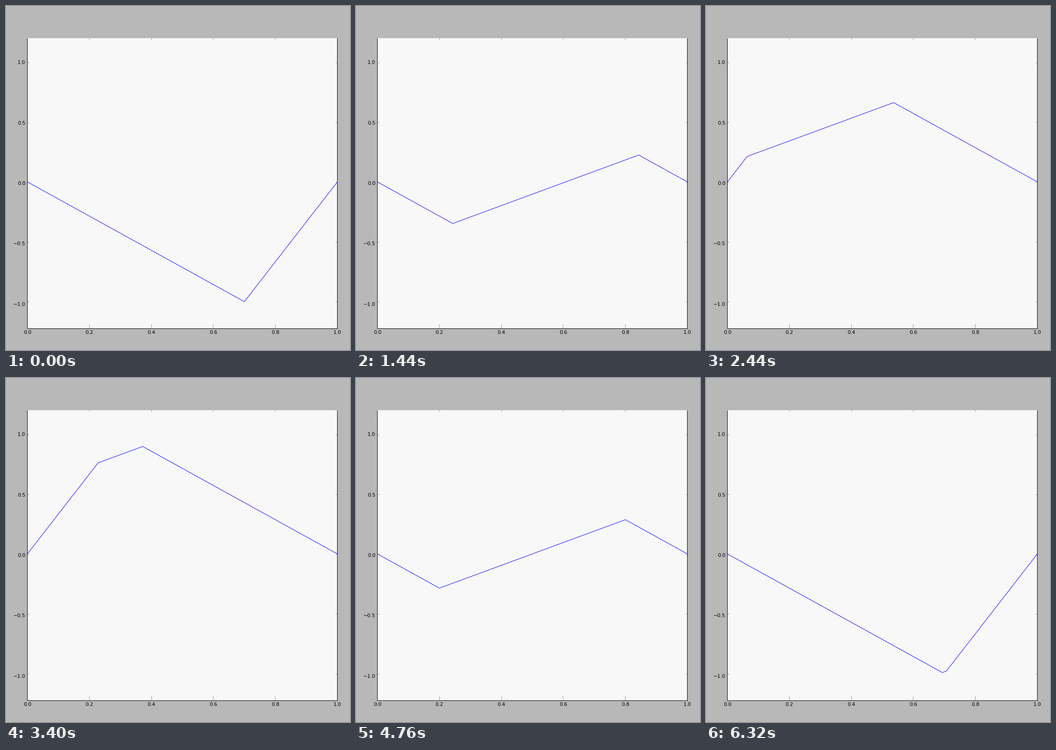
A matplotlib script for the animation above (6.36 s loop, 748 by 748 pixels).

```python
import numpy as np
import matplotlib.pyplot as plt
from matplotlib.animation import FuncAnimation

SIZE, DPI = 748, 100
FRAMES, INTERVAL = 159, 40
PX = 72 / DPI  # points per pixel

LEFT, RIGHT, TOP, BOTTOM = 46.5, 720.5, 70, 700.5
ZERO_Y, UNIT_Y = 382.5, 260.4
LABEL_ZERO, LABEL_UNIT = 385, 262.8  # labels sit on a slightly taller scale
PLUCK = 0.7

# Distance travelled by the kinks, with the slight unevenness of the playback.
KEYS = [0, 36, 48, 61, 85, 119, 134, 144, 158]
TRAVEL = [0, .457, .61, .7637, 1.072, 1.5, 1.689, 1.809, 1.9935]

plt.rcParams["font.family"] = "DejaVu Sans"
fig = plt.figure(figsize=(SIZE / DPI, SIZE / DPI), dpi=DPI, facecolor="#b8b8b8")
ax = fig.add_axes([0, 0, 1, 1])
ax.set(xlim=(0, SIZE), ylim=(SIZE, 0))
ax.axis("off")


def to_x(x):
    return LEFT + (RIGHT - LEFT) * np.asarray(x)


def to_y(y):
    return ZERO_Y - UNIT_Y * np.asarray(y)


def stroke(x0, y0, x1, y1, color="black", width=1.0):
    ax.plot([x0, x1], [y0, y1], color=color, lw=width * PX,
            solid_capstyle="butt", zorder=2)


def tick(x0, y0, x1, y1):
    stroke(x0, y0, x1, y1, "#777777", 0.9)


def label(x, y, value, ha):
    text = f"{value:.1f}".replace("-", "\u2212")
    ax.text(x, y, text, fontsize=11 * PX, ha=ha, va="center_baseline", color="black")


def draw_axes():
    ax.add_patch(plt.Rectangle((46, TOP), 675, 631, fc="#f8f8f8", lw=0))
    for i in range(6):
        x = float(to_x(i / 5))
        label(x, 709, i / 5, "center")
        if 0 < i < 5:
            x = int(x) + 0.5
            tick(x, 70, x, 73)
            tick(x, 692, x, 696)
            tick(x, 697, x, 700)
    for value in (-1, -0.5, 0, 0.5, 1):
        y = int(to_y(value)) + 0.5
        tick(47, y, 50, y)
        tick(717, y, 720, y)
        label(42.5, LABEL_ZERO - LABEL_UNIT * value, value, "right")
    stroke(LEFT, TOP, LEFT, 701)
    stroke(46, BOTTOM, 721, BOTTOM)
    stroke(RIGHT, TOP, RIGHT, 701)


def wave(u):
    """Odd, periodic extension of the plucked shape."""
    return np.interp(np.mod(u, 2), [0, PLUCK, 2 - PLUCK, 2], [0, -1, 1, 0])


def fold(u):
    u %= 2
    return min(u, 2 - u)


draw_axes()
string, = ax.plot([], [], color="#1c1cff", lw=1.1 * PX, zorder=3,
                  solid_capstyle="butt", solid_joinstyle="miter")


def update(i):
    s = np.interp(i, KEYS, TRAVEL)
    x = np.array(sorted([0, fold(PLUCK - s), fold(PLUCK + s), 1]))
    y = (wave(x + s) + wave(x - s)) / 2
    string.set_data(to_x(x), to_y(y))
    return string,


anim = FuncAnimation(fig, update, frames=FRAMES, interval=INTERVAL,
                     repeat=True, repeat_delay=0, blit=False)
plt.show()
```
